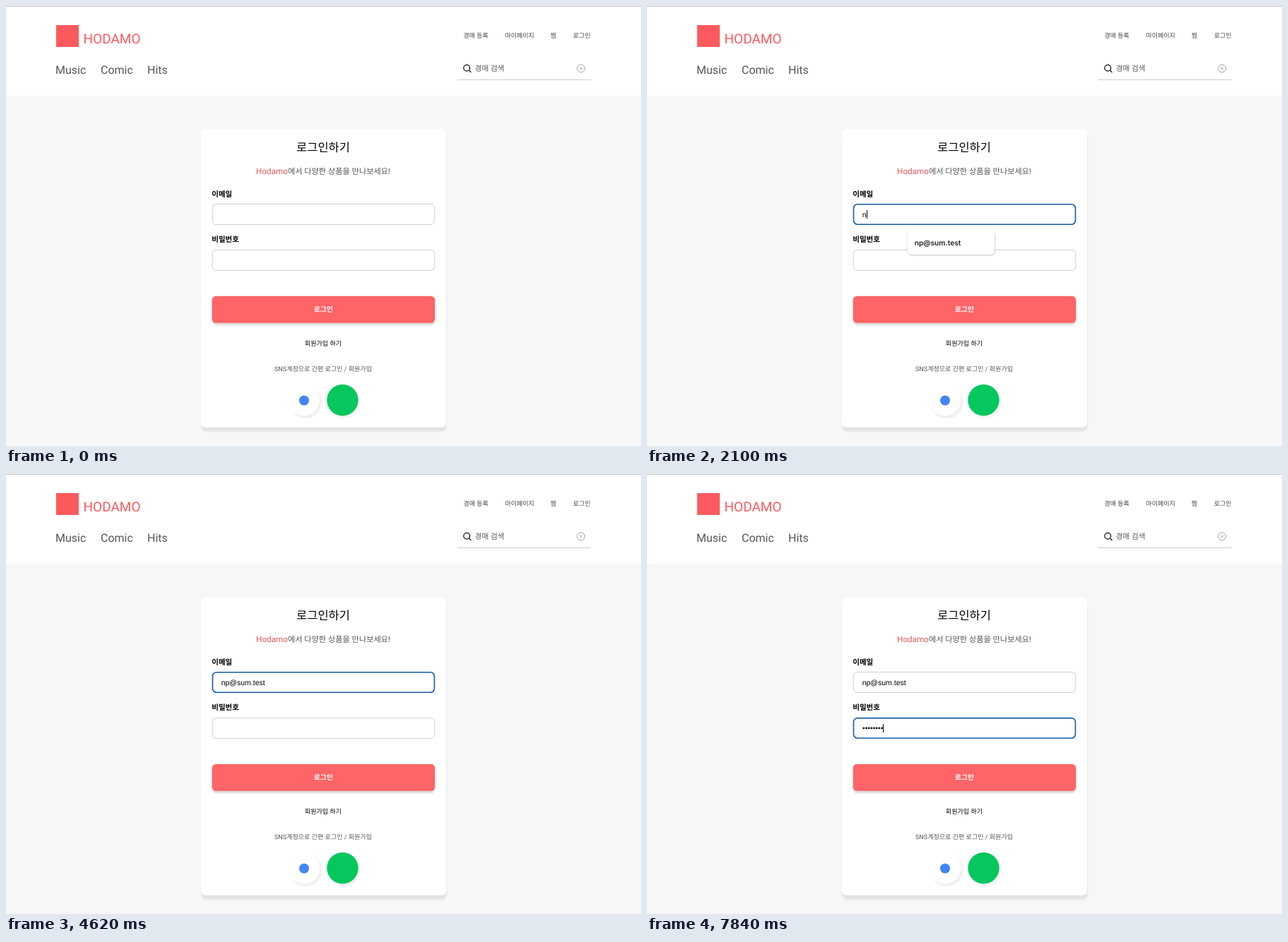
An HTML page that plays this animation: 899x623 px, repeating every 8000 ms.

```html
<!DOCTYPE html>
<html lang="ko">
<head>
<meta charset="utf-8">
<title>로그인</title>
<style>
  html, body { margin: 0; width: 100%; height: 100%; overflow: hidden; background: #f7f7f7; }
  svg { display: block; width: 100vw; height: 100vh; }
  text { font-family: Roboto, "Noto Sans CJK KR", sans-serif; text-rendering: geometricPrecision; white-space: pre; }
  .mid { text-anchor: middle; }
  .menu text { font-size: 9px; fill: #444; }
  .nav text { font-size: 16px; fill: #555; }
  .label { font-size: 10.5px; font-weight: 700; }
  .popup text { font: 600 10.2px Inter, "Noto Sans CJK KR", sans-serif; fill: #222; }
  .popup .plain { font-size: 9.6px; font-weight: 400; }
  .typed { font: 10.5px "Liberation Sans", Arial, sans-serif; }
  .line { fill: none; stroke: #222; stroke-width: 1.1; }
  .hidden { display: none; }
</style>
</head>
<body>
<svg viewBox="0 0 899 623">
  <defs>
    <filter id="soft" x="-20%" y="-20%" width="140%" height="140%"><feGaussianBlur stdDeviation="1.2"/></filter>
    <g id="mail" class="line">
      <rect x=".5" y=".5" width="9.5" height="8" rx="1"/>
      <path d="M.8 1.5 5.25 4.8 9.7 1.5"/>
    </g>
  </defs>

  <rect width="899" height="623" fill="#f7f7f7"/>
  <rect width="899" height="127" fill="#fff"/>
  <rect width="899" height="1" fill="#c6c6c6"/>

  <!-- header -->
  <rect x="71" y="27" width="32" height="31" fill="#fc5a5e"/>
  <text x="109.5" y="53" font-size="19" fill="#fb5a5e">HODAMO</text>
  <g class="nav">
    <text x="70" y="96">Music</text>
    <text x="134" y="96">Comic</text>
    <text x="200" y="96">Hits</text>
  </g>
  <g class="menu">
    <text x="647.5" y="44.8">경매 등록</text>
    <text x="706.5" y="44.8">마이페이지</text>
    <text x="770.7" y="44.8">찜</text>
    <text x="802.7" y="44.8">로그인</text>
  </g>
  <g fill="none">
    <circle cx="652.3" cy="87.7" r="4.4" stroke="#111" stroke-width="1.3"/>
    <path d="M655.5 91 658.5 94" stroke="#111" stroke-width="1.3"/>
    <circle cx="814" cy="88.4" r="5.5" stroke="#999" stroke-width=".9"/>
    <path d="M812 86.4l4 4m0-4l-4 4" stroke="#999" stroke-width=".9"/>
    <path d="M639 104.5H828" stroke="#ccc"/>
  </g>
  <text x="663.7" y="92.2" font-size="10.7" fill="#555">경매 검색</text>

  <!-- card -->
  <rect x="276.5" y="181" width="347" height="421.5" rx="7" fill="#e3e3e3" filter="url(#soft)"/>
  <rect x="276" y="174.5" width="347" height="422" rx="6" fill="#fff"/>
  <text class="mid" x="449" y="205.6" font-size="16.5">로그인하기</text>
  <text class="mid" x="449" y="238" font-size="11.2" fill="#555"><tspan font-size="11.7" fill="#e2585c">Hodamo</tspan>에서 다양한 상품을 만나보세요!</text>

  <text class="label" x="291.3" y="269.5">이메일</text>
  <text class="label" x="291.3" y="334">비밀번호</text>
  <rect id="mailBox"/>
  <rect id="passBox"/>
  <text id="mailText" class="typed" x="304.7" y="299"></text>
  <g id="dots"></g>
  <rect id="caret" width="1" height="12"/>

  <rect x="292" y="414" width="315" height="38" rx="6" fill="#000" opacity=".14" filter="url(#soft)"/>
  <rect x="291.7" y="410.8" width="315.6" height="38" rx="5.5" fill="#ff6466"/>
  <text class="mid" x="449.3" y="433" font-size="9.9" font-weight="700" fill="#fff">로그인</text>
  <text class="mid" x="449" y="481" font-size="9.1" font-weight="500">회원가입 하기</text>
  <text class="mid" x="449" y="516.5" font-size="9.05" fill="#555">SNS계정으로 간편 로그인 / 회원가입</text>

  <g fill="#000" opacity=".06" filter="url(#soft)">
    <circle cx="424.5" cy="561" r="23"/>
    <circle cx="478.5" cy="560.5" r="23"/>
  </g>
  <circle cx="422" cy="558" r="22.2" fill="#fff"/>
  <circle cx="422" cy="558.5" r="7" fill="#4285f4"/>
  <circle cx="476.5" cy="558" r="22.2" fill="#05c75d"/>

  <!-- suggestions -->
  <g id="allMails" class="popup">
    <rect x="369" y="319" width="169" height="98" rx="6" opacity=".3" filter="url(#soft)"/>
    <rect x="369" y="318" width="168.5" height="97.5" rx="6" fill="#fff"/>
    <use href="#mail" x="381" y="330.3"/>
    <use href="#mail" x="381" y="358.6"/>
    <text x="403.7" y="338.5">dmint3117zz@mowa.test</text>
    <text x="403.7" y="366.8">mintd3117zz@mowa.test</text>
    <path d="M369 380.6H537.5" stroke="#fbe5ab" stroke-width="1.7"/>
    <circle cx="386.3" cy="398.3" r="5.5" fill="#333"/>
    <text class="plain" x="403.7" y="402">주소 관리...</text>
  </g>
  <g id="oneMail" class="popup">
    <rect x="369" y="319" width="123.5" height="34" rx="6" opacity=".25" filter="url(#soft)"/>
    <rect x="369" y="318" width="123" height="34" rx="6" fill="#fff"/>
    <text x="378.7" y="338.5">np@sum.test</text>
  </g>
</svg>
<script>
  const LOOP = 8000;
  const EMAIL = "np@sum.test";
  const START_X = 305;
  const DOT_STEP = 3.67;
  const mailKeys = [2100, 2520, 3010, 3290, 3360, 3500, 3570, 3710, 3920, 4060, 4130];
  const passKeys = [6090, 6230, 6300, 6440, 7490, 7560, 7630, 7840];
  const caretOff = [[0, 1260], [1820, 2100], [4620, 5180], [5740, 6090], [6930, 7490]];
  const FOCUS_MAIL = 1260, FOCUS_PASS = 5180;

  const el = id => document.getElementById(id);
  const set = (node, attrs) => Object.entries(attrs).forEach(([k, v]) => node.setAttribute(k, v));
  const show = (id, on) => el(id).classList.toggle("hidden", !on);
  const within = (t, a, b) => t >= a && t < b;
  const countKeys = (keys, t) => keys.filter(k => k <= t).length;

  const dots = passKeys.map((_, i) => {
    const dot = document.createElementNS("http://www.w3.org/2000/svg", "circle");
    set(dot, { cx: START_X + 1.8 + i * DOT_STEP, cy: 359.8, r: 1.4 });
    return el("dots").appendChild(dot);
  });

  function drawBox(id, y, focused) {
    const stroke = focused ? 1.6 : 0.9;
    set(el(id), {
      x: 291.7 + stroke / 2, y: y + stroke / 2, width: 315.6 - stroke, height: 30 - stroke, rx: 5.5,
      fill: "#fff", stroke: focused ? "#1259a9" : "#c9c9c9", "stroke-width": stroke
    });
  }

  function render(t) {
    const typed = countKeys(mailKeys, t);
    const secret = countKeys(passKeys, t);
    const onPass = t >= FOCUS_PASS;

    drawBox("mailBox", 280, within(t, FOCUS_MAIL, FOCUS_PASS));
    drawBox("passBox", 344.8, onPass);
    el("mailText").textContent = EMAIL.slice(0, typed);
    dots.forEach((dot, i) => dot.classList.toggle("hidden", i >= secret));

    const advance = onPass ? secret * DOT_STEP : typed ? el("mailText").getComputedTextLength() : 0;
    set(el("caret"), { x: Math.round(START_X + advance), y: onPass ? 354 : 289 });
    show("caret", !caretOff.some(([a, b]) => within(t, a, b)));

    show("allMails", within(t, FOCUS_MAIL, mailKeys[0]));
    show("oneMail", within(t, mailKeys[0], mailKeys.at(-1)));
  }

  const start = performance.now();
  function tick() {
    render((performance.now() - start) % LOOP);
    requestAnimationFrame(tick);
  }
  tick();
</script>
</body>
</html>
```
